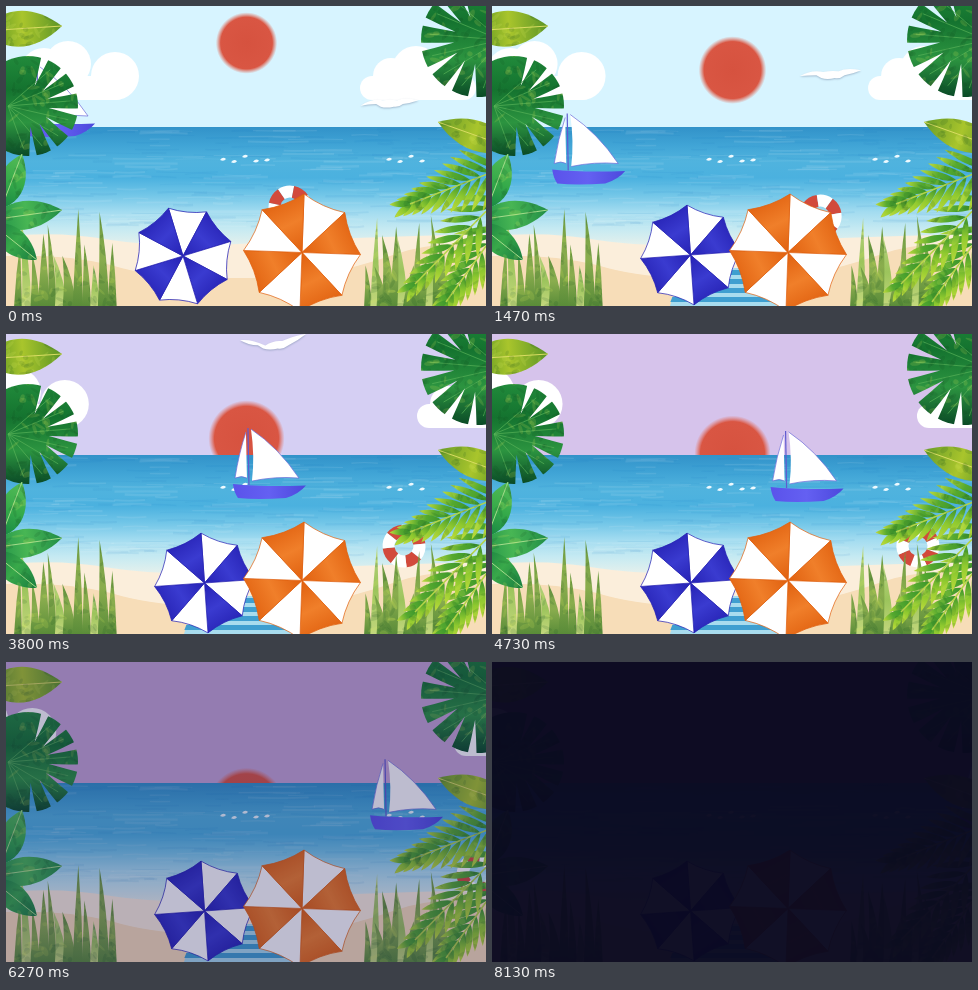
Recreate the animation shown at these times as an HTML page with a canvas. Size 480 by 300 pixels, loop 8270 ms.

```html
<!DOCTYPE html>
<html>
<head>
<meta charset="utf-8">
<title>Beach day</title>
<style>
html, body { margin: 0; width: 100%; height: 100%; overflow: hidden; }
canvas { display: block; width: 480px; height: 300px; }
</style>
</head>
<body>
<canvas id="stage" width="480" height="300"></canvas>
<script>
const stage = document.getElementById('stage');
const LOOP = 8270, HORIZON = 121, TAU = Math.PI * 2;
let c = stage.getContext('2d');

const clamp = v => Math.max(0, Math.min(1, v));
const mix = (a, b, k) => a + (b - a) * k;
const easeOut = k => 1 - (1 - clamp(k)) ** 2;

function randomizer(seed) {
  return (lo = 0, hi = 1) => mix(lo, hi, (seed = seed * 16807 % 2147483647) / 2147483647);
}

function fill(color, d) {
  c.fillStyle = color;
  c.fill(new Path2D(d));
}

function line(color, width, d) {
  c.strokeStyle = color;
  c.lineWidth = width;
  c.stroke(new Path2D(d));
}

function oval(x, y, rx, ry, color, turn = 0) {
  c.fillStyle = color;
  c.beginPath();
  c.ellipse(x, y, rx, ry, turn, 0, TAU);
  c.fill();
}

function gradient(x0, y0, x1, y1, ...colors) {
  const g = c.createLinearGradient(x0, y0, x1, y1);
  colors.forEach((color, i) => g.addColorStop(i / (colors.length - 1), color));
  return g;
}

function layer(draw) {
  const canvas = document.createElement('canvas'), main = c;
  canvas.width = 480;
  canvas.height = 300;
  c = canvas.getContext('2d');
  draw();
  c = main;
  return canvas;
}

// Pointed leaf from base to tip
function leaf(x0, y0, x1, y1, w, ...colors) {
  const len = Math.hypot(x1 - x0, y1 - y0);
  const nx = (y0 - y1) / len * w, ny = (x1 - x0) / len * w;
  const p = (k, s) => `${mix(x0, x1, k) + nx * s} ${mix(y0, y1, k) + ny * s}`;
  fill(gradient(x0, y0, x1, y1, ...colors),
    `M${x0} ${y0}C${p(.25, 1)} ${p(.65, 1)} ${x1} ${y1}C${p(.65, -1)} ${p(.25, -1)} ${x0} ${y0}`);
}

function veinedLeaf(x0, y0, x1, y1, w, vein, ...colors) {
  leaf(x0, y0, x1, y1, w, ...colors);
  line(vein, 1, `M${x0} ${y0}L${x1} ${y1}`);
}

// Rounded leaf whose rim is cut by slits; side 1 faces right, -1 left
function monstera(x, y, rx, ry, side) {
  oval(x, y, rx, ry, gradient(x, y - ry, x, y + ry, '#218a3b', '#14732f', '#2c9440', '#0a4a26'));
  for (let a = -1.25; a < 1.5; a += .45) {
    const p = (k, turn) => `${x + side * rx * k * Math.cos(a + turn)} ${y + ry * k * Math.sin(a + turn)}`;
    c.globalCompositeOperation = 'destination-out';
    fill('#000', `M${p(.42, 0)}Q${p(.75, .08)} ${p(1.1, .1)}L${p(1.1, -.06)}Q${p(.75, -.03)} ${p(.42, 0)}`);
    c.globalCompositeOperation = 'source-over';
    line('#58b258', .7, `M${x - side * rx * .4} ${y}L${p(.85, .23)}`);
  }
}

function clump(left, right, seed) {
  const rnd = randomizer(seed);
  for (let i = 0; i < 12; i++) {
    const x = mix(left, right, i / 11), w = rnd(4, 7), pale = i % 4 === 1;
    const tip = 300 - (i % 3 === 1 ? rnd(78, 98) : rnd(38, 75)), tx = x + rnd(-8, 5), mid = (tip + 300) / 2;
    const colors = pale ? ['#b6d27e', '#9cc45c', '#c3d77c'] : ['#6b9a40', '#8aad4e', '#5a8c39'];
    fill(gradient(0, tip, 0, 300, ...colors),
      `M${x - w} 302Q${x - w * .6} ${mid} ${tx} ${tip}Q${x + w * .8} ${mid} ${x + w} 302Z`);
  }
}

function frond(x0, y0, x1, y1) {
  const spine = Math.atan2(y1 - y0, x1 - x0);
  for (let k = .08; k <= 1; k += .1) {
    for (const side of [-1, 1]) {
      const x = mix(x0, x1, k), y = mix(y0, y1, k), a = spine + side * mix(.85, .3, k), len = mix(48, 22, k);
      leaf(x, y, x + len * Math.cos(a), y + len * Math.sin(a), 4.5, '#3a942c', side < 0 ? '#8fc92f' : '#55a92f', '#c0dc3c');
    }
  }
  line('#b4d446', 1.5, `M${x0} ${y0}L${x1} ${y1}`);
}

const shore = layer(() => {
  c.fillStyle = gradient(0, HORIZON, 0, 240, '#3292c9', '#3fa3d5', '#50b3de', '#4bb1df', '#72c6e8', '#a3dcf0', '#c6eaf2', '#e6f1ec');
  c.fillRect(0, HORIZON, 480, 125);
  const rnd = randomizer(77);
  for (let i = 0; i < 260; i++) {
    const x = rnd(-20, 480), y = HORIZON + rnd(2, 100), w = rnd(12, 67);
    line(i % 2 ? 'rgba(255,255,255,.09)' : 'rgba(20,120,190,.08)', rnd(.6, 2.5), `M${x} ${y}q${w / 2} ${rnd(-2, 2)} ${w} 0`);
  }
  fill('#fbeedb', 'M0 230Q55 225 105 234Q150 241 205 239T320 233Q400 230 480 228V300H0Z');
  fill('#f7ddb8', 'M0 250Q60 248 105 259Q140 270 190 272L300 272Q350 262 390 248T480 240V300H0Z');
  for (const [x, count] of [[217, 5], [383, 4]]) {
    for (let i = 0; i < count; i++) {
      const y = 153 + 3 * Math.sin(i * 2.3);
      fill('#eefaff', `M${x + i * 11 - 3} ${y + 1}q3 -4 6 -1q-2 3 -6 1`);
    }
  }
});

const plants = layer(() => {
  monstera(22, 100, 50, 50, 1);
  monstera(472, 34, 57, 57, -1);
  clump(12, 106, 5);
  clump(362, 438, 31);
  veinedLeaf(-22, 25, 56, 20, 24, '#d9dc62', '#4c8c22', '#a9c52c', '#5b9426');
  veinedLeaf(-5, 203, 16, 148, 18, '#a5dc8b', '#168542', '#36ab4a', '#55bb57');
  veinedLeaf(-15, 214, 56, 204, 19, '#a5dc8b', '#1b8c45', '#48b654', '#218d46');
  veinedLeaf(-14, 218, 31, 254, 17, '#a5dc8b', '#147a3f', '#39a94a', '#187d40');
  veinedLeaf(505, 142, 432, 116, 20, '#d9dc62', '#4f8f24', '#a9c52c', '#699c28');
  frond(498, 215, 440, 296);
  frond(500, 185, 409, 278);
  frond(502, 160, 404, 198);

  // Watercolour dabs, kept inside the leaves
  const rnd = randomizer(9);
  c.globalCompositeOperation = 'source-atop';
  for (let i = 0; i < 900; i++) {
    const x = i % 2 ? rnd(0, 115) : rnd(360, 480);
    oval(x, rnd(0, 300), rnd(2, 7), rnd(1, 3), i % 3 ? 'rgba(8,70,25,.13)' : 'rgba(215,235,90,.16)', rnd(0, TAU));
  }
});

function sky(t) {
  const day = [215, 244, 255], lilac = [213, 209, 244], mauve = [215, 184, 228], dusk = [150, 115, 175];
  const dim = clamp((t - 1470) / 2200), warm = clamp((t - 3670) / 1900), late = clamp((t - 5570) / 2500);
  c.fillStyle = `rgb(${day.map((v, i) => mix(mix(mix(v, lilac[i], dim), mauve[i], warm), dusk[i], late))})`;
  c.fillRect(0, 0, 480, 300);
}

function sun(t) {
  const x = 240.5, y = 37 + .0188 * t - 2.8e-7 * t * t, r = Math.min(36, 29 + .002 * t);
  const g = c.createRadialGradient(x, y, 0, x, y, r * 1.06);
  g.addColorStop(0, '#d6523f');
  g.addColorStop(.84, '#d95643');
  g.addColorStop(1, 'rgba(230,110,90,0)');
  oval(x, y, r * 1.06, r * 1.06, g);
}

function cloud(shift, left, right, puffs) {
  c.save();
  c.translate(shift, 0);
  c.fillStyle = '#fff';
  c.beginPath();
  c.roundRect(left, 70, right - left, 24, 12);
  c.fill();
  for (const [x, y, r] of puffs) oval(x, y, r, r, '#fff');
  c.restore();
}

function gull(t) {
  const s = .92 + 3.5e-5 * t, lift = 7 * clamp(t / 3800) ** 2;
  c.save();
  c.translate(384 - .0306 * t, 97 - .0175 * t - 1.4e-6 * t * t);
  c.scale(s, s);
  c.shadowColor = 'rgba(110,130,160,.5)';
  c.shadowBlur = 2;
  c.shadowOffsetY = 1;
  fill('#fff', `M-32 ${3 - lift}Q-20 -5 -8 ${-3 + lift * .6}Q0 -4 8 -3Q16 -7 31 ${-3 - lift}Q23 ${-lift * .5} 14 1Q9 5 4 4Q-4 6 -10 4L-15 1Q-24 1 -32 ${3 - lift}`);
  c.restore();
}

// Sails in with a slow start and a fading bob
function boat(t) {
  const lag = t < 2730 ? 38 * Math.sin(Math.PI * t / 2730) ** 2 : 0;
  c.save();
  c.translate(31 + .0555 * t - lag, 97 - 37 * Math.exp(-t / 1500) * Math.cos(Math.PI * t / 1900));
  fill(gradient(-16, 0, 58, 0, '#5a52ea', '#6460f2', '#4c48dc'), 'M-15 56Q15 59 58 57.5Q51 66 38 70Q10 72 -10 70Q-14 64 -15 56');
  fill('#fff', 'M3 1Q31 20 51 50Q27 48 4 53Q7 28 3 1');
  fill('#fff', 'M-2 4Q-9 25 -13 50Q-6 47 -1 50Z');
  line('#6c6bd8', .7, 'M3 1Q31 20 51 50Q27 48 4 53M-2 4Q-9 25 -13 50Q-6 47 -1 50');
  line('#5f5bd0', 1.2, 'M0 0L1 57');
  c.restore();
}

function buoy(t) {
  const roll = .03 * t;
  c.save();
  c.translate(284 + roll, 212 - 11 * (1 - easeOut(t / 2500)));
  c.rotate(roll / 22 - .2);
  for (let i = 0; i < 8; i++) {
    const a = (i - .5) * TAU / 8;
    c.strokeStyle = i % 2 ? '#d24a3c' : '#fff';
    c.lineWidth = 12;
    c.beginPath();
    c.arc(0, 0, 15.5, a, a + TAU / 8);
    c.stroke();
  }
  c.restore();
}

function towel(alpha) {
  c.save();
  c.globalAlpha = alpha;
  fill('#a8dcee', 'M190 262H273L286 300H178Z');
  for (let y = 264; y < 300; y += 9) {
    const k = (y - 262) / 3;
    fill('#3f9fd0', `M${190 - k} ${y}H${273 + k}l2 5H${188 - k}Z`);
  }
  c.restore();
}

// Eight panels, white first, clockwise from the given angle in degrees
function umbrella(x, y, r, angle, light, dark) {
  c.save();
  c.translate(x, y);
  c.rotate((angle - 90) * Math.PI / 180);
  for (let i = 0; i < 8; i++) {
    c.beginPath();
    c.moveTo(0, 0);
    c.lineTo(r, 0);
    c.quadraticCurveTo(r * .84 * Math.cos(TAU / 16), r * .84 * Math.sin(TAU / 16), r * Math.SQRT1_2, r * Math.SQRT1_2);
    c.closePath();
    c.fillStyle = i % 2 ? gradient(0, 0, r, r * .3, dark, light, dark) : '#fff';
    c.fill();
    c.strokeStyle = dark;
    c.lineWidth = .7;
    c.stroke();
    c.rotate(TAU / 8);
  }
  c.restore();
}

function night(t) {
  const k = clamp((t - 5500) / 2630), deep = k * k;
  c.fillStyle = `rgba(${mix(26, 10, deep)},${mix(22, 9, deep)},${mix(95, 31, deep)},${k * .97})`;
  c.fillRect(0, 0, 480, 300);
}

function draw(t) {
  const roll = easeOut(t / 1400);
  sky(t);
  sun(t);
  cloud(-.0132 * t, 25, 122, [[62, 58, 23], [109, 70, 24], [38, 66, 24]]);
  cloud(.015 * t, 354, 470, [[385, 70, 18], [410, 64, 24], [440, 66, 26]]);
  gull(t);
  c.drawImage(shore, 0, 0);
  boat(t);
  buoy(t);
  towel(roll);
  umbrella(mix(177, 198.5, roll), mix(250, 249, roll), 50, mix(-17, -4, roll), '#3a3bd0', '#2622b4');
  umbrella(296, 246.5, 58.5, 2, '#f07f2a', '#e0600f');
  c.drawImage(plants, 0, 0);
  night(t);
}

const start = performance.now();
function tick() {
  draw((performance.now() - start) % LOOP);
  requestAnimationFrame(tick);
}
tick();
</script>
</body>
</html>
```
